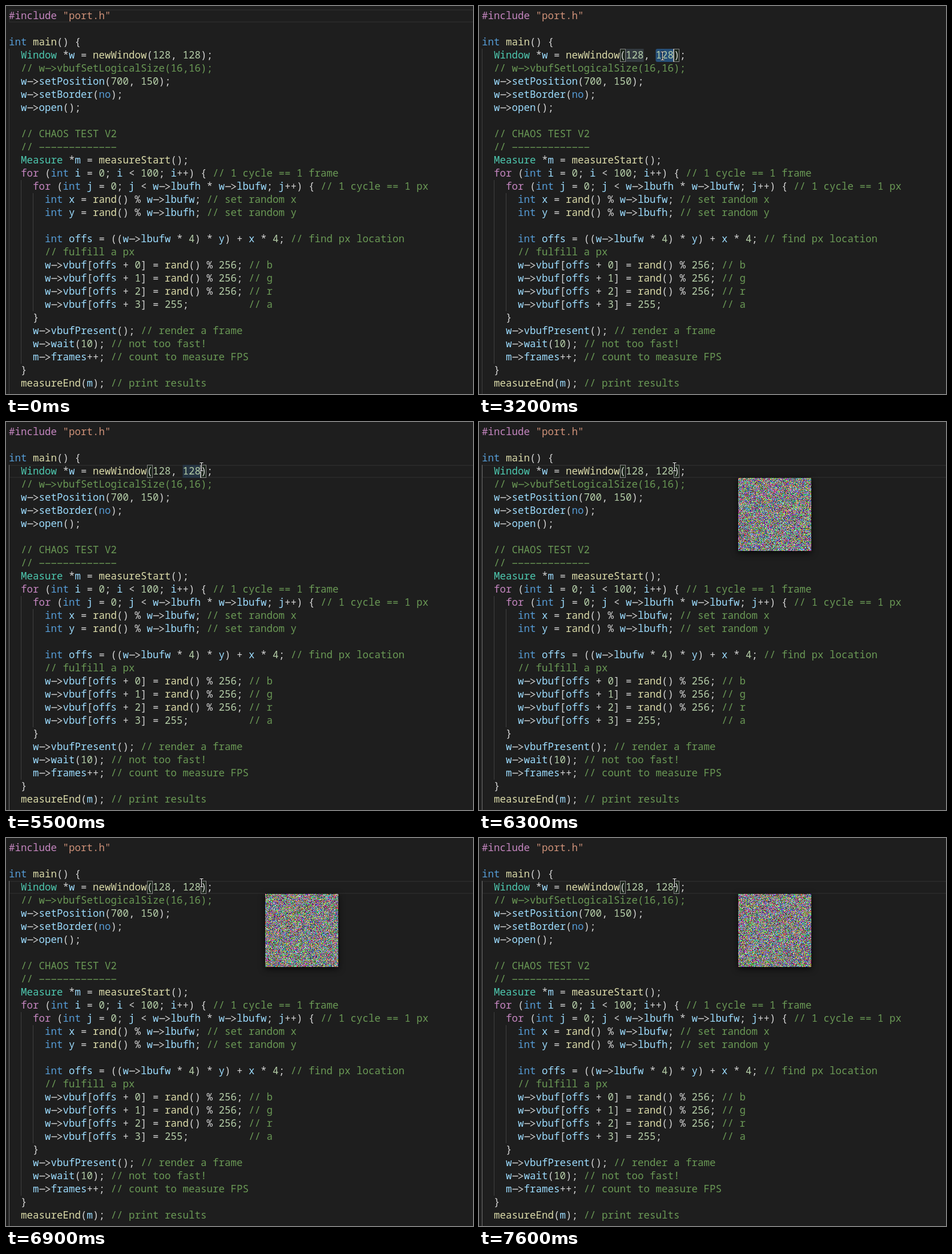
Write an HTML page with a canvas that moves like this. It is 818 px wide and 680 px high and loops after 8000 ms.

```html
<!DOCTYPE html>
<html lang="en">
<head>
<meta charset="utf-8">
<title>Code editor</title>
<style>
html, body { margin: 0; width: 100%; height: 100%; overflow: hidden; background: #1e1e1e; }
canvas { display: block; }
</style>
</head>
<body>
<canvas id="stage" width="818" height="680"></canvas>
<script>
const g = document.getElementById('stage').getContext('2d');
const LOOP = 8000, LEFT = 5, TOP = 6, CHAR = 10.5, LINE = 23, BASE = 17;
const SIZE = 128, WIN_X = 454, WIN_Y = 98;

const code = `#include "port.h"

int main() {
  Window *w = newWindow(128, 128);
  // w->vbufSetLogicalSize(16,16);
  w->setPosition(700, 150);
  w->setBorder(no);
  w->open();

  // CHAOS TEST V2
  // -------------
  Measure *m = measureStart();
  for (int i = 0; i < 100; i++) { // 1 cycle == 1 frame
    for (int j = 0; j < w->lbufh * w->lbufw; j++) { // 1 cycle == 1 px
      int x = rand() % w->lbufw; // set random x
      int y = rand() % w->lbufh; // set random y

      int offs = ((w->lbufw * 4) * y) + x * 4; // find px location
      // fulfill a px
      w->vbuf[offs + 0] = rand() % 256; // b
      w->vbuf[offs + 1] = rand() % 256; // g
      w->vbuf[offs + 2] = rand() % 256; // r
      w->vbuf[offs + 3] = 255;          // a
    }
    w->vbufPresent(); // render a frame
    w->wait(10); // not too fast!
    m->frames++; // count to measure FPS
  }
  measureEnd(m); // print results`.split('\n');

const rules = [
  [/^\/\//, '#6a9955'], [/^"/, '#ce9178'], [/^(#include|for)$/, '#c586c0'],
  [/^(int|no)$/, '#569cd6'], [/^(Window|Measure)$/, '#4ec9b0'],
  [/^(main|rand|newWindow|measure\w+)$/, '#dcdcaa'],
  [/^\d/, '#b5cea8'], [/^[a-z]/, '#9cdcfe'], [/^/, '#d4d4d4']
];

const colX = col => LEFT + col * CHAR;
const rowY = row => TOP + row * LINE;

function rect(x, y, w, h, color) {
  g.fillStyle = color;
  g.fillRect(x, y, w, h);
}

// Arrow operator: a long dash that stops short of the chevron's tip
function arrow(x, y) {
  g.lineWidth = 1.4;
  g.beginPath();
  g.moveTo(x + 1, y);
  g.lineTo(x + 11, y);
  g.moveTo(x + 11.5, y - 4.5);
  g.lineTo(x + 19, y);
  g.lineTo(x + 11.5, y + 4.5);
  g.stroke();
}

function drawCode() {
  g.font = '17.5px "Noto Sans Mono", "DejaVu Sans Mono", monospace';
  code.forEach((line, row) => {
    const y = rowY(row);
    for (const { 0: token, index } of line.matchAll(/\/\/.*|".*"|->|#?\w+|\S/g)) {
      g.fillStyle = g.strokeStyle = rules.find(([test]) => test.test(token))[1];
      for (let i = 0; i < token.length; i++) {
        const x = colX(index + i);
        if (token.startsWith('->', i)) { arrow(x, y + 11.5); i++; }
        else if (token[i] === '-') g.fillRect(x + 1, y + 11, 8.5, 1.4);
        else g.fillText(token[i], x, y + BASE);
      }
    }
  });
}

function drawGuides(active) {
  const guide = (col, from, to, color) =>
    rect(Math.floor(colX(col)), rowY(from), 1, (to - from) * LINE, color);
  guide(0, 3, 30, active ? '#707070' : '#404040');
  guide(2, 13, 27, '#404040');
  guide(4, 14, 23, '#404040');
}

function drawCurrentLine(row) {
  g.strokeStyle = '#282828';
  g.lineWidth = 2;
  g.strokeRect(LEFT + 1, rowY(row) + 1, 830, LINE - 2);
}

function drawBracket(col) {
  const x = Math.round(colX(col));
  rect(x, rowY(3), 10, LINE, 'rgba(0,100,0,.1)');
  g.strokeStyle = '#888';
  g.lineWidth = 1;
  g.strokeRect(x + .5, rowY(3) + .5, 9, LINE - 1);
}

// Pointer centre: time, x, y
const path = [
  [400, 130, 4], [500, 165, 10], [600, 200, 14], [700, 218, 15], [1600, 218, 15],
  [1700, 230, 35], [1800, 255, 65], [1900, 277, 86], [2000, 270, 90], [2100, 270, 90],
  [2400, 321, 87], [4000, 321, 87], [4100, 318, 86], [4200, 318, 86],
  [4400, 344, 80], [4500, 342, 78], [LOOP, 342, 78]
];

function drawPointer(t) {
  if (t < path[0][0]) return;
  const i = path.findIndex(p => p[0] > t);
  const a = path[i - 1], b = path[i], k = (t - a[0]) / (b[0] - a[0]);
  const x = Math.round(a[1] + (b[1] - a[1]) * k) + .5;
  const y = Math.round(a[2] + (b[2] - a[2]) * k) + .5;
  for (const [color, width] of [['#111', 2.5], ['#fff', 1]]) {
    g.strokeStyle = color;
    g.lineWidth = width;
    g.beginPath();
    for (const s of [-1, 1]) {
      g.moveTo(x - 3, y + s * 7);
      g.lineTo(x + 3, y + s * 7);
    }
    g.moveTo(x, y - 7);
    g.lineTo(x, y + 7);
    g.stroke();
  }
}

const noise = new OffscreenCanvas(SIZE, SIZE), noiseCtx = noise.getContext('2d');
let noiseStep;

function drawNoise(step) {
  if (step !== noiseStep) {
    noiseStep = step;
    const image = noiseCtx.createImageData(SIZE, SIZE);
    let seed = step * 7919;
    image.data.forEach((_, i) => {
      seed = (Math.imul(seed, 1664525) + 1013904223) >>> 0;
      image.data[i] = i % 4 === 3 ? 255 : seed >>> 24;
    });
    noiseCtx.putImageData(image, 0, 0);
  }
  g.save();
  g.shadowColor = 'rgba(0,0,0,.8)';
  g.shadowBlur = 12;
  g.shadowOffsetY = 3;
  g.drawImage(noise, WIN_X, WIN_Y);
  g.restore();
}

function draw(time) {
  const t = Math.floor(time % LOOP / 100) * 100;
  const during = (...spans) => spans.some(([from, to]) => t >= from && t < to);
  const selected = during([2400, 4100]), onCall = t >= 2300;

  rect(0, 0, 818, 680, '#1e1e1e');
  if (!selected) drawCurrentLine(onCall ? 3 : 0);
  drawGuides(onCall && !selected);
  if (selected) {
    g.fillStyle = '#264f78';
    g.beginPath();
    g.roundRect(colX(29), rowY(3), 3 * CHAR, LINE, 3);
    g.fill();
  }
  if (during([3200, 4100])) rect(colX(24), rowY(3), 3 * CHAR, LINE, '#333a40');
  if (during([4800, 5600])) rect(colX(29), rowY(3), 3 * CHAR, LINE, '#263442');
  if (onCall) [23, 32].forEach(drawBracket);
  drawCode();

  if (during([1000, 1500], [2000, 2300])) rect(183, rowY(0), 2, LINE, '#aeafad');
  if (during([2300, 3300], [3900, 5000], [5500, 6100])) rect(340, rowY(3), 2, LINE, '#aeafad');
  if (t >= 6300) drawNoise(Math.min(t, 7600) / 100);
  drawPointer(t);
}

function tick() {
  draw(performance.now());
  requestAnimationFrame(tick);
}
tick();
</script>
</body>
</html>
```
